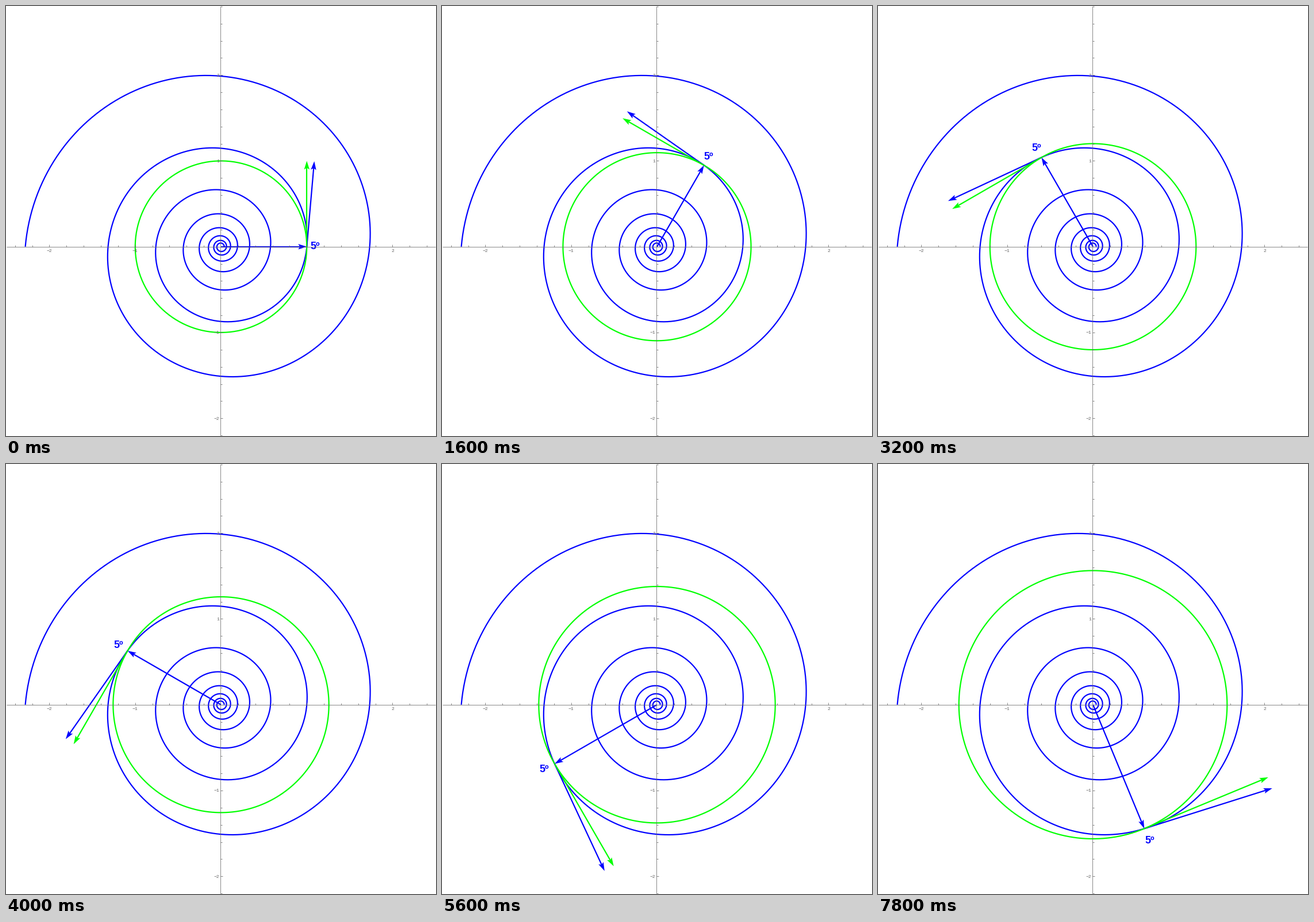
Recreate the animation shown at these times as a matplotlib script. Size 748 by 748 pixels, loop 8000 ms.

```python
import numpy as np
import matplotlib.pyplot as plt
from matplotlib.animation import FuncAnimation

SIZE, DPI = 748, 100
PX = 72 / DPI                 # points per pixel
CX, CY, UNIT = 374.0, 418.7, 149.25
FRAMES, STEP = 40, 7.5        # degrees per frame
PITCH = np.radians(5)
GROWTH = np.tan(PITCH)
BLUE, GREEN, GRAY = "#0000ff", "#00ff00", "#666666"
HEAD = np.array([[0, 0], [-15, 4.7], [-12, 0], [-15, -4.7]])

fig = plt.figure(figsize=(SIZE / DPI, SIZE / DPI), dpi=DPI, facecolor="white")
ax = fig.add_axes([0, 0, 1, 1])
ax.set_xlim(0, SIZE)
ax.set_ylim(SIZE, 0)
ax.axis("off")


def to_px(z):
    """Stage coordinates of complex plane points."""
    return CX + UNIT * np.real(z), CY - UNIT * np.imag(z)


def spiral(t):
    return np.exp((GROWTH + 1j) * t)


def curve(z, color, order):
    return ax.plot(*to_px(z), color=color, lw=2.2 * PX, zorder=order,
                   solid_capstyle="butt")[0]


class Arrow:
    def __init__(self, color, order):
        self.shaft = ax.plot([], [], color=color, lw=2.2 * PX, zorder=order,
                             solid_capstyle="butt")[0]
        self.head = plt.Polygon(HEAD, fc=color, ec="none", zorder=order)
        ax.add_patch(self.head)

    def place(self, start, end):
        x0, y0 = to_px(start)
        x1, y1 = to_px(end)
        dx, dy = np.array([x1 - x0, y1 - y0]) / np.hypot(x1 - x0, y1 - y0)
        pts = HEAD @ np.array([[dx, dy], [-dy, dx]]) + [x1, y1]
        self.shaft.set_data([x0, pts[2, 0]], [y0, pts[2, 1]])
        self.head.set_xy(pts)


def draw_axes():
    style = dict(color=GRAY, lw=0.9 * PX, alpha=0.85, zorder=10,
                 solid_capstyle="butt")
    font = dict(family="Liberation Mono", size=8 * PX, color=GRAY, zorder=10)
    ox, oy = 373.5, 418.5
    ax.plot([1, 747], [oy, oy], **style)
    ax.plot([ox, ox], [0.5, 747], **style)
    for k in range(-12, 15):
        if k == 0:
            continue
        size = 4 if k % 5 == 0 else 2.5
        x, y = to_px(k / 5 * (1 + 1j))
        if k <= 12:
            ax.plot([x, x], [oy, oy - size], **style)
        if k >= -11:
            ax.plot([ox, ox + size], [y, y], **style)
    for n in (-2, -1, 1, 2):
        text = str(n).replace("-", "\u2212")
        x, y = to_px(n * (1 + 1j))
        if n != 1:
            ax.text(x, 425, text, ha="center", va="center_baseline", **font)
        ax.text(371.5, y, text, ha="right", va="center_baseline", **font)


curve(spiral(np.linspace(-12 * np.pi, 3 * np.pi, 3000)), BLUE, 1)
ring = np.exp(1j * np.linspace(0, 2 * np.pi, 400))
circle = curve(ring, GREEN, 2)
radius = Arrow(BLUE, 3)
slope = Arrow(BLUE, 4)
tangent = Arrow(GREEN, 5)
label = ax.text(0, 0, "5\u00ba", family="Liberation Sans", weight="bold",
                size=18 * PX, color=BLUE, ha="center", va="center", zorder=6)
draw_axes()


def update(i):
    p = spiral(np.radians(STEP * i))
    circle.set_data(*to_px(abs(p) * ring))
    radius.place(0, p)
    slope.place(p, p + 1j * p * np.exp(-1j * PITCH))
    tangent.place(p, p + 1j * p)
    label.set_position(to_px(1.1 * p))
    return ()


anim = FuncAnimation(fig, update, frames=FRAMES, interval=200, repeat=True,
                     repeat_delay=0, init_func=lambda: update(0))
plt.show()
```
